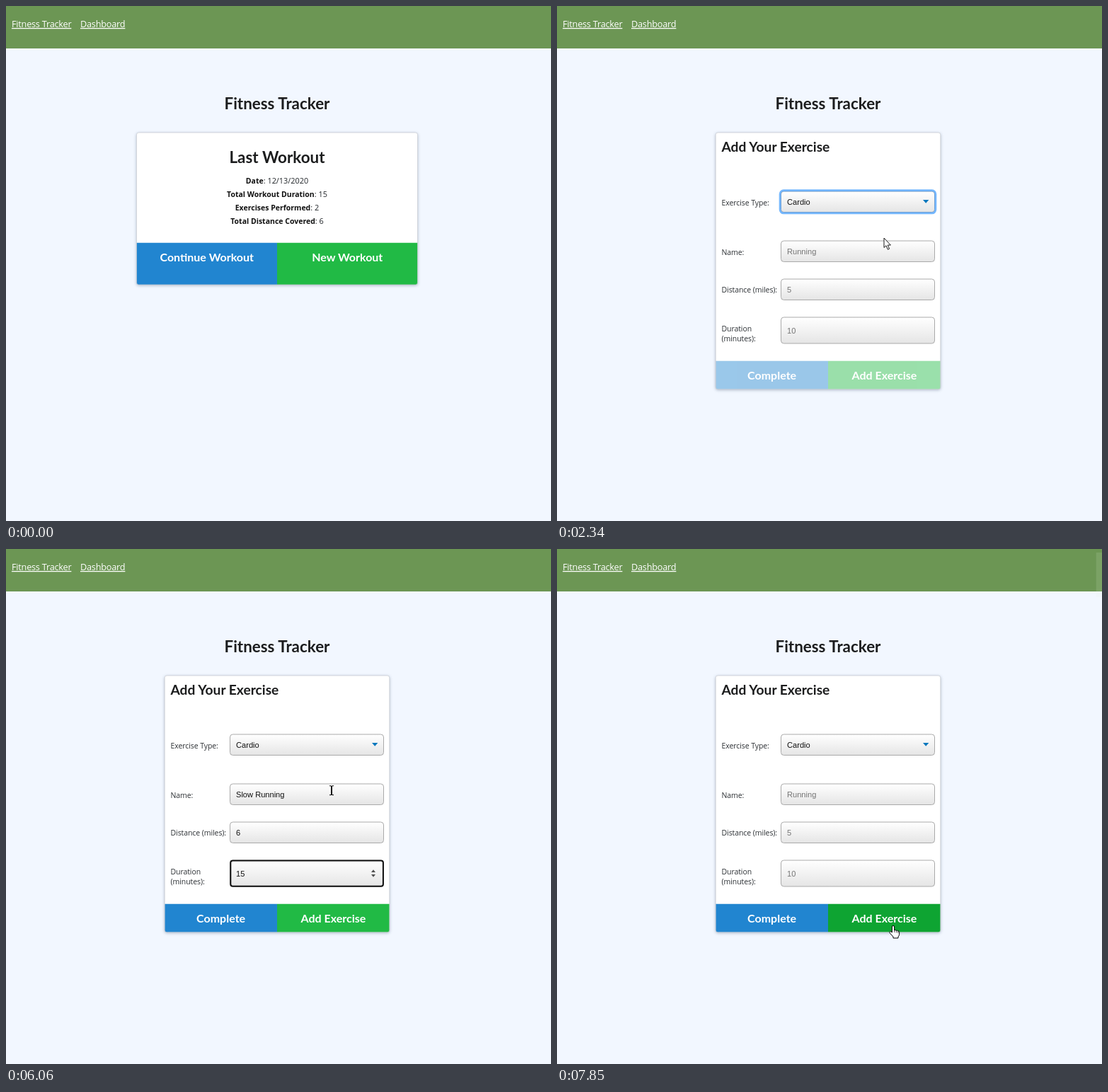
An HTML page for the animation above (8 s loop, 770 px wide and 728 px high).

```html
<!DOCTYPE html>
<html lang="en">
<head>
<meta charset="utf-8">
<title>Workout form</title>
<style>
  html, body { margin: 0; width: 100%; height: 100%; overflow: hidden; background: #f2f7ff; }
  svg { display: block; width: 100%; height: 100%; }
  .heading { font: 700 22.4px Lato, sans-serif; fill: #1c1d1e; }
  .subheading { font: 700 19.2px Lato, sans-serif; fill: #1c1d1e; }
  .button { font: 700 16px Lato, sans-serif; fill: #fff; }
  .nav { font: 12.7px "Open Sans", sans-serif; letter-spacing: -.22px; fill: #fff; text-decoration: underline; }
  .stat { font: 10.9px "Open Sans", sans-serif; fill: #212529; }
  .stat tspan { font-weight: 700; font-size: 10.5px; fill: #111; }
  .label { font: 10.5px "Open Sans", sans-serif; letter-spacing: -.08px; fill: #2b2f33; }
  .value { font: 11.1px "Liberation Sans", Arial, sans-serif; fill: #111; }
  .hint { fill: #757575; }
  .toast { font: 700 13px Lato, sans-serif; fill: #3c763d; }
  .mid { text-anchor: middle; }
  .card { fill: #fff; filter: drop-shadow(0 1px 2px rgba(55, 75, 105, .4)); }
</style>
</head>
<body>
<svg id="stage" viewBox="0 0 770 728">
  <defs>
    <linearGradient id="shade" x2="0" y2="1">
      <stop stop-color="#fff"/><stop offset="1" stop-color="#e5e5e5"/>
    </linearGradient>
  </defs>
  <g id="scene"></g>
</svg>
<script>
const LOOP = 8000;
const scene = document.getElementById('scene');
const ruler = document.createElement('canvas').getContext('2d');

const clamp = v => Math.max(0, Math.min(1, v));
const progress = (t, from, to) => clamp((t - from) / (to - from));
const between = (t, from, to) => t >= from && t < to;

const text = (x, y, cls, content) => `<text x="${x}" y="${y}" class="${cls}">${content}</text>`;
const rect = (x, y, w, h, attrs) => `<rect x="${x}" y="${y}" width="${w}" height="${h}" ${attrs}/>`;
const path = (d, attrs) => `<path d="${d}" ${attrs}/>`;

const textWidth = s => {
  ruler.font = '11.1px "Liberation Sans", Arial, sans-serif';
  return ruler.measureText(s).width;
};

// [time, content]: the last entry already reached is shown
const typing = {
  name: [[0, ''], [3230, 'S'], [3460, 'Sl'], [3550, 'Slo'], [3640, 'Slow '], [3730, 'Slow R'], [3820, 'Slow Ru'],
    [3960, 'Slow Run'], [4030, 'Slow Runn'], [4100, 'Slow Runni'], [4170, 'Slow Runnin'], [4240, 'Slow Running'], [6740, '']],
  distance: [[0, ''], [4920, '6'], [6740, '']],
  duration: [[0, ''], [5600, '1'], [5740, '15'], [6740, '']]
};
const typed = (steps, t) => steps.filter(s => s[0] <= t).pop()[1];

// [time, x, y] of the pointer's hot spot
const route = [[140, 682, 664], [290, 512, 400], [430, 512, 400], [530, 494, 371], [1120, 494, 371], [1410, 466, 284],
  [1540, 466, 284], [1890, 462, 328], [2390, 462, 328], [2600, 460, 341], [6150, 460, 341], [6520, 475, 533], [LOOP, 475, 533]];

function pointerAt(t) {
  const i = route.findIndex(k => k[0] > t);
  const [t0, x0, y0] = route[i - 1], [t1, x1, y1] = route[i];
  const p = progress(t, t0, t1), e = p * p * (3 - 2 * p);
  return { x: x0 + (x1 - x0) * e, y: y0 + (y1 - y0) * e };
}

const cursors = {
  arrow: path('M0 0V13.5L3 10.7L5.4 16.2L7.6 15.2L5.2 10H9.4Z', 'fill="#fff" stroke="#000" stroke-width=".9"'),
  hand: path('M-1.6 9V1Q-1.6 -.5 0 -.5T1.6 1V6Q3.2 4.8 4.2 6.5Q5.8 5.4 6.6 7.2Q8.4 6.6 8.6 8.5V11.5Q8.4 14 7 15V17H0V15L-4.4 10.4Q-5.8 8.2 -4.4 7.6Q-3.2 7.4 -1.6 9Z',
    'fill="#fff" stroke="#000"') + path('M1.6 6V9M4.3 6.5V9.5M6.8 7.2V10', 'stroke="#000" stroke-width=".7"'),
  beam: path('M-3 -6.2H-1L0 -5.5L1 -6.2H3M-3 6.7H-1L0 6L1 6.7H3', 'fill="none" stroke="#000"') +
    path('M0 -6V6.5', 'stroke="#000" stroke-width="1.8"')
};

function pointer(t) {
  if (t < 140) return '';
  const { x, y } = pointerAt(t);
  let kind = 'arrow';
  if (between(t, 470, 1000) || t > 6000 && y > 501) kind = 'hand';
  else if (t > 2470 && y < 478) kind = 'beam';
  return `<g transform="translate(${x} ${y})">${cursors[kind]}</g>`;
}

function card(x, y, w, h, content) {
  return rect(x, y, w, h, 'rx="3" class="card"') + content +
    rect(x, y, w, h, 'rx="3" fill="none" stroke="#c9ccd2" stroke-opacity=".7"');
}

function buttonPair(x, y, w, h, baseline, left, right, green, opacity = 1) {
  const half = w / 2, mid = x + half, bottom = y + h;
  return `<g opacity="${opacity}">` +
    path(`M${x} ${y}H${mid}V${bottom}H${x + 3}Q${x} ${bottom} ${x} ${bottom - 3}Z`, 'fill="#2185d0"') +
    path(`M${mid} ${y}H${x + w}V${bottom - 3}Q${x + w} ${bottom} ${x + w - 3} ${bottom}H${mid}Z`, `fill="${green}"`) +
    '</g>' + text(x + half / 2, baseline, 'button mid', left) + text(mid + half / 2, baseline, 'button mid', right);
}

function summary(t) {
  const stats = [['Date', '12/13/2020'], ['Total Workout Duration', 15], ['Exercises Performed', 2], ['Total Distance Covered', 6]];
  return card(184.5, 179, 397, 215,
    text(383, 222, 'heading mid', 'Last Workout') +
    stats.map(([k, v], i) => text(383, 251 + i * 19, 'stat mid', `<tspan>${k}</tspan>: ${v}`)).join('') +
    buttonPair(184.5, 334.7, 397, 59.3, 361.3, 'Continue Workout', 'New Workout', t > 470 ? '#16ab39' : '#21ba45'));
}

const box = (y, h) => rect(316.5, y, 217, h, 'rx="4" fill="url(#shade)" stroke="#aaa"');

function field(y, h, value, hint, focused, caretOn, spinner) {
  const mid = y + h / 2;
  let out = box(y, h) + text(325, mid + 4, value ? 'value' : 'value hint', value || hint);
  if (!focused) return out;
  out += rect(317.3, y + .5, 215.6, h - .8, 'rx="3" fill="none" stroke="#101010" stroke-width="2"');
  if (caretOn) out += rect(Math.round(325 + textWidth(value)), mid - 6.5, 1, 13, 'fill="#000"');
  if (spinner) out += path(`M516 ${mid - 1.5}h6l-3 -3.8zM516 ${mid + 1.5}h6l-3 3.8z`, 'fill="#505050"');
  return out;
}

function select(t) {
  const focused = between(t, 1380, 2520);
  return text(232.5, 282, 'label', 'Exercise Type:') + box(262, 29.5) +
    (focused ? rect(315.2, 260.8, 219.6, 32, 'rx="5" fill="none" stroke="#3b99fc" stroke-opacity=".7" stroke-width="3"') : '') +
    text(325, 281, 'value', t < 2250 ? 'Select Exercise Type' : 'Cardio') +
    path('M517 274h8.4l-4.2 4.8z', 'fill="#0b78bd"');
}

function optionList(t) {
  if (!between(t, 1410, 2250)) return '';
  const { y } = pointerAt(t), row = 16.8;
  const active = Math.max(0, Math.min(2, Math.floor((y - 293) / row)));
  return rect(317, 293, 216, row * 3, 'fill="#fff" stroke="#767676"') +
    ['Select Exercise Type', 'Resistance', 'Cardio'].map((label, i) => {
      const top = 293 + i * row, on = i === active;
      return (on ? rect(317.5, top, 215, row, 'fill="#1e90ff"') : '') +
        `<text x="325" y="${top + 12.3}" class="value"${on ? ' style="fill:#fff"' : ''}>${label}</text>`;
    }).join('');
}

function cardioFields(t) {
  const caretOff = between(t, 3000, 3230) || between(t, 4740, 4920) || between(t, 6060, 6400);
  return text(232.5, 351.5, 'label', 'Name:') +
    text(232.5, 405.3, 'label', 'Distance (miles):') +
    text(232.5, 459.5, 'label', 'Duration') + text(232.5, 474.3, 'label', '(minutes):') +
    field(332, 29.5, typed(typing.name, t), 'Running', between(t, 2520, 4420), !caretOff) +
    field(386, 29.5, typed(typing.distance, t), 5, between(t, 4420, 5240), !caretOff, true) +
    field(440, 37, typed(typing.duration, t), 10, between(t, 5240, 6600), !caretOff, true);
}

function form(t) {
  const open = t >= 2250, bottom = open ? 541.8 : 355.8, top = bottom - 40;
  const hovered = t > 6000 && pointerAt(t).y > 501;
  const green = t >= 6600 ? '#0ea432' : hovered ? '#16ab39' : '#21ba45';
  return card(224.2, 179, 317.6, bottom - 179,
    text(232.5, 206, 'subheading', 'Add Your Exercise') + select(t) + (open ? cardioFields(t) : '') +
    buttonPair(224.2, top, 317.6, 40, top + 26.5, 'Complete', 'Add Exercise', green, .45 + .55 * progress(t, 5580, 5740))) +
    optionList(t);
}

function statusBubble(t) {
  const height = 20 * (progress(t, 500, 560) - progress(t, 690, 800));
  return height > 0 ? rect(-4, 728 - height, 106.5, 30, 'rx="3" fill="#202124"') : '';
}

function toast(t) {
  const hidden = 1 - progress(t, 6660, 6900) + progress(t, 7450, 7865);
  if (hidden >= 1) return '';
  return `<g transform="translate(${246 * hidden} 0)" opacity="${1 - .9 * hidden}">` +
    rect(524, 5, 246, 63, 'fill="#dff0d8"') + text(647, 41, 'toast mid', 'Workout Saved Successfully!') + '</g>';
}

function draw(now) {
  const t = now % LOOP;
  scene.innerHTML = rect(0, 0, 770, 728, 'fill="#f2f7ff"') + rect(0, 0, 770, 60, 'fill="#6c9654"') +
    text(8, 30, 'nav', 'Fitness Tracker') + text(105, 30, 'nav', 'Dashboard') +
    text(383, 146.3, 'heading mid', 'Fitness Tracker') +
    (t < 680 ? summary(t) : form(t)) + statusBubble(t) + toast(t) + pointer(t);
  requestAnimationFrame(draw);
}
requestAnimationFrame(draw);
</script>
</body>
</html>
```
